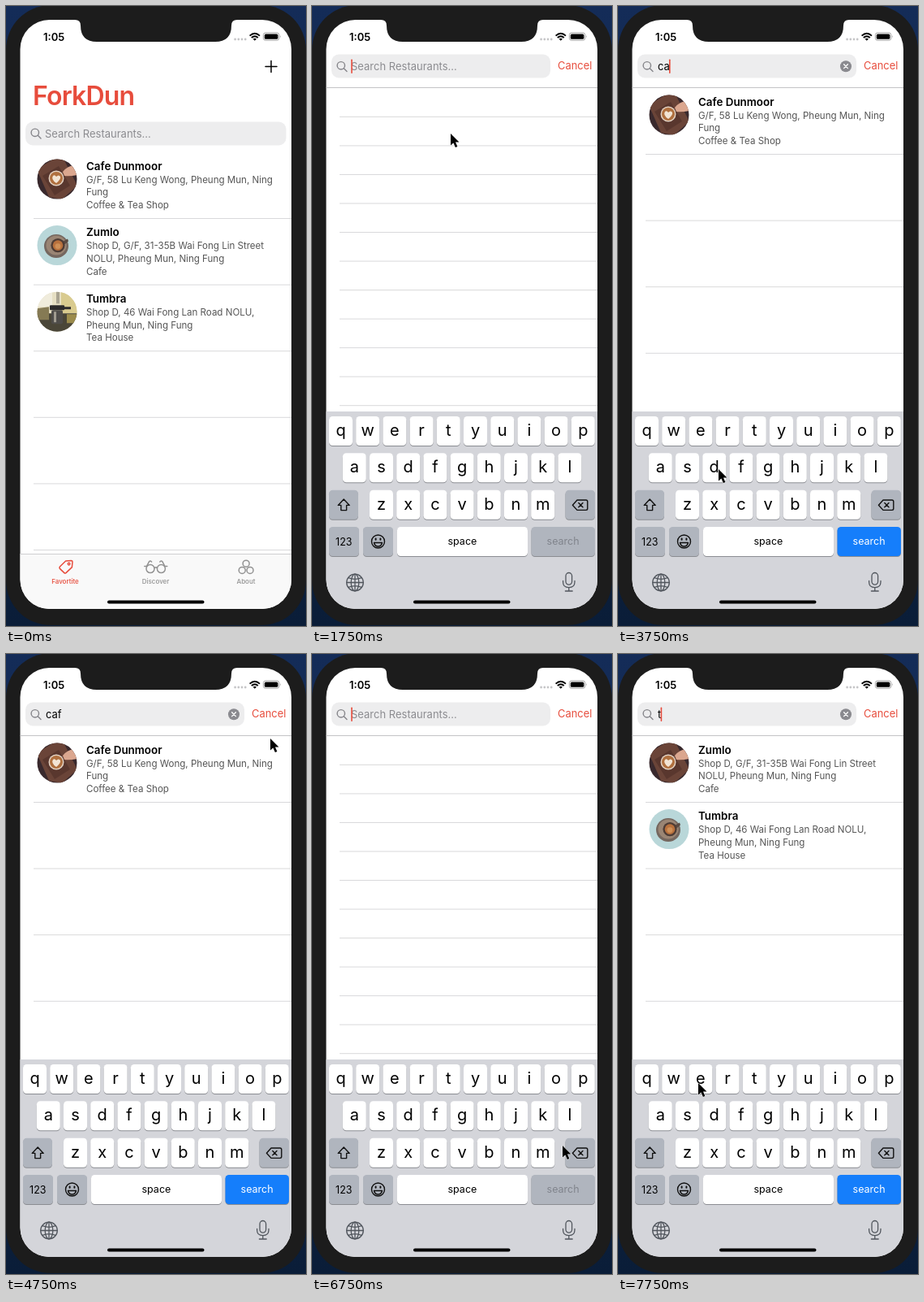
Recreate the animation shown at these times as an HTML page. Size 370 by 763 pixels, loop 8 s.

```html
<!DOCTYPE html>
<html lang="en">
<head>
<meta charset="utf-8">
<title>Restaurant search</title>
<style>
  html, body { margin: 0; width: 100%; height: 100%; overflow: hidden; background: #0b1a33; }
  svg { display: block; width: 100%; height: 100%; font-family: Inter, Roboto, "Liberation Sans", sans-serif; }
  .mid { text-anchor: middle; }
  .title { font-size: 13.4px; font-weight: 600; }
  .sub { font-size: 11.55px; fill: #555; }
  .field { font-size: 13px; }
  .hint { fill: #8c8c90; }
  .key { font-size: 20px; text-anchor: middle; }
  .small { font-size: 12.5px; text-anchor: middle; }
  .tab { font-size: 8px; font-weight: 500; text-anchor: middle; fill: #929292; }
  .rule { stroke: #d9d9db; stroke-width: 1; }
  .line { fill: none; stroke-linecap: round; stroke-linejoin: round; }
</style>
</head>
<body>
<svg viewBox="0 0 370 763" xmlns="http://www.w3.org/2000/svg">
  <defs>
    <linearGradient id="desk" x1="0" y1="0" x2="0" y2="1">
      <stop offset="0" stop-color="#142c58"/><stop offset="1" stop-color="#0a1d38"/>
    </linearGradient>
    <clipPath id="screen"><rect x="17.5" y="17" width="334.5" height="725" rx="36"/></clipPath>
    <clipPath id="round"><circle r="24.5"/></clipPath>

    <g id="photo0" clip-path="url(#round)">
      <rect x="-25" y="-25" width="50" height="50" fill="#39292d"/>
      <path d="M-25 -12 L-4 -25 H8 L25 8 L6 25 L-10 22Z" fill="#6a4438"/>
      <path d="M-18 -4 L2 -16 L16 8 L-3 20Z" fill="#59372e"/>
      <path d="M7 -9 Q14 -18 25 -17 V-5 Q15 -3 9 -4Z" fill="#dba78f"/>
      <circle cx="-1" cy="-1" r="9.5" fill="#e3d3c4"/>
      <circle cx="-1" cy="-1" r="8" fill="#b0703f"/>
      <path d="M-1 5 Q-8 0 -5 -4 Q-3 -6 -1 -3 Q2 -6 4 -3 Q5 0 -1 5Z" fill="#f2e4d4"/>
    </g>
    <g id="photo1" clip-path="url(#round)">
      <rect x="-25" y="-25" width="50" height="50" fill="#b9d7d9"/>
      <ellipse cx="-1" cy="1" rx="15" ry="14.5" fill="#75675f"/>
      <ellipse cx="-1" cy="0" rx="12.5" ry="12" fill="#9a8574"/>
      <path d="M6 -4 L13 -8 L14 -5 L8 0Z" fill="#5b4a42"/>
      <circle cx="1" cy="0" r="8.6" fill="#4e3c35"/>
      <circle cx="1" cy="0" r="6.3" fill="#b9713d"/>
      <circle cx="1" cy="1" r="3.4" fill="#cf9057"/>
    </g>
    <g id="photo2" clip-path="url(#round)">
      <rect x="-25" y="-25" width="50" height="50" fill="#e6dfc3"/>
      <path d="M-25 -25 H-6 V-6 H-25Z" fill="#f0ecdc"/>
      <path d="M5 -25 H25 V2 H5Z" fill="#d9cb8f"/>
      <path d="M-25 2 H25 V25 H-25Z" fill="#4a4638"/>
      <path d="M-25 -4 L-10 -6 V10 H-25Z" fill="#857a54"/>
      <path d="M12 3 H25 V14 H12Z" fill="#9b8b4c"/>
      <path d="M-1 -25 H3 V-10 H-1Z" fill="#a9a391"/>
      <rect x="-9" y="-8" width="18" height="6" rx="1" fill="#2d2b2b"/>
      <rect x="-7" y="-2" width="14" height="17" rx="2" fill="#4f4d4a"/>
      <rect x="-4" y="0" width="3" height="13" fill="#a09b90"/>
      <path d="M8 -6 H17 V-3 H8Z" fill="#2d2b2b"/>
    </g>
    <g id="lens" class="line" stroke="#85858a" stroke-width="1.4">
      <circle cx="-1.2" cy="-1.2" r="4.7"/><path d="M2.3 2.3 L6 6"/>
    </g>
  </defs>

  <rect width="370" height="763" fill="url(#desk)"/>
  <rect x="0" y="-1" width="370" height="763" rx="55" fill="#1c1c1c"/>
  <g clip-path="url(#screen)">
    <rect x="17" y="17" width="336" height="726" fill="#fff"/>
    <g id="home"></g>
    <g id="find"></g>
    <path d="M85 16 V17 Q92 17 92 24 Q92 44 112 44 H258 Q278 44 278 24 Q278 17 285 17 V16Z" fill="#1c1c1c"/>
    <text x="46" y="42.5" font-size="13" font-weight="600">1:05</text>
    <g fill="#c6c6c8">
      <circle cx="282.6" cy="41" r="1.4"/><circle cx="286.8" cy="41" r="1.4"/>
      <circle cx="291" cy="41" r="1.4"/><circle cx="295.2" cy="41" r="1.4"/>
    </g>
    <g fill="none" stroke="#000" stroke-width="1.9">
      <path d="M300.6 36.6 Q306.8 31 313 36.6"/><path d="M302.8 39 Q306.8 35.4 310.8 39"/>
    </g>
    <path d="M304.6 40.6 Q306.8 38.8 309 40.6 L306.8 42.8Z"/>
    <rect x="317.4" y="33" width="19.4" height="9.2" rx="2.6" fill="none" stroke="#9a9a9a" stroke-width=".9"/>
    <rect x="318.8" y="34.4" width="16.6" height="6.4" rx="1.5"/>
    <path d="M338 36 Q339.4 37.6 338 39.3Z" fill="#9a9a9a"/>
    <rect x="125" y="731.4" width="119.5" height="4.2" rx="2.1"/>
  </g>
  <path id="pointer" d="M0 0 V14.6 L3.4 11.5 L5.9 17 L8.4 15.9 L6 10.5 H10.5Z" stroke="#fff" stroke-width="1" stroke-linejoin="round" paint-order="stroke"/>
</svg>
<script>
const RED = '#e74c3c', ROW = 81.6;
const $ = id => document.getElementById(id);

const places = [
  ['Cafe Dunmoor', 'G/F, 58 Lu Keng Wong, Pheung Mun, Ning', 'Fung', 'Coffee & Tea Shop'],
  ['Zumlo', 'Shop D, G/F, 31-35B Wai Fong Lin Street', 'NOLU, Pheung Mun, Ning Fung', 'Cafe'],
  ['Tumbra', 'Shop D, 46 Wai Fong Lan Road NOLU,', 'Pheung Mun, Ning Fung', 'Tea House']
];

const text = (x, y, cls, s, more = '') =>
  `<text x="${x}" y="${y}" class="${cls}" ${more}>${s.replace('&', '&amp;')}</text>`;
const rule = (y, x = 34) => `<path class="rule" d="M${x} ${y}H352"/>`;
const rules = (y, gap, n) => Array.from({ length: n }, (_, i) => rule(y + gap * i)).join('');
const box = (x, y, w, h, r, fill, more = '') =>
  `<rect x="${x}" y="${y}" width="${w}" height="${h}" rx="${r}" fill="${fill}" ${more}/>`;

// Photos belong to the row position, texts to the filtered result.
const list = (items, top) => items.map(([name, ...lines], i) => {
  const y = top + ROW * i;
  return `<use href="#photo${i}" x="63" y="${y + 33}"/>` + text(99, y + 21.6, 'title', name) +
    lines.map((s, j) => text(99, y + 37.7 + 15.7 * j, 'sub', s)).join('');
}).join('');

const tabs = `
  <g class="line" stroke="${RED}" stroke-width="1.5">
    <path d="M73.6 683 L80.4 682.4 Q82 682.4 82 684 L81.4 690.6 L74 697.6 Q72.8 698.6 71.6 697.4 L66.4 692.4 Q65.4 691.2 66.4 690Z"/>
    <circle cx="77.6" cy="686.6" r="1.3"/>
  </g>
  <g class="line" stroke="#929292" stroke-width="1.5">
    <circle cx="178" cy="692.6" r="5"/><circle cx="191.4" cy="692.6" r="5"/>
    <path d="M183 691.6 Q184.7 690 186.4 691.6 M170.8 689.6 H173.6 M195.8 689.6 H198.8 M173.4 689.6 L176.6 683.6 Q178 682.4 179.6 684 M196 689.6 L192.8 683.6 Q191.4 682.4 189.8 684"/>
    <circle cx="296.1" cy="686.2" r="4"/><circle cx="291.2" cy="694.4" r="4"/><circle cx="301" cy="694.4" r="4"/>
  </g>` +
  text(73, 711, 'tab', 'Favortite', `style="fill:${RED}"`) +
  text(184.6, 711, 'tab', 'Discover') + text(296, 711, 'tab', 'About');

$('home').innerHTML =
  '<path class="line" d="M320 74.5H334M327 67.5V81.500" stroke="#000" stroke-width="1.5"/>' +
  text(33, 122.3, '', 'ForkDun', `font-size="32" font-weight="600" letter-spacing="-.8" fill="${RED}"`) +
  box(24, 142.5, 321.5, 29, 9, '#ededee') +
  '<use href="#lens" x="37" y="157"/>' + text(48, 161.6, 'field hint', 'Search Restaurants...') +
  list(places, 180) + rules(261.5, ROW, 6) +
  box(17, 674, 336, 70, 0, '#f9f9f9') + '<path d="M17 674.5H352" stroke="#cfcfd1"/>' + tabs;

const key = (x, y, w, fill, id = '') =>
  box(x, y + 1, w, 36, 4.5, '#8b8d92') + box(x, y, w, 36, 4.5, fill, id && `id="${id}"`);
const keys = (letters, x, y) => [...letters].map((c, i) =>
  key(x + 33.2 * i, y, 29, '#fff') + text(x + 33.2 * i + 14.5, y + 23.8, 'key', c)).join('');

const GREY = '#b0b5be';
const keyboard = box(17, 499, 336, 244, 0, '#d4d5da') +
  keys('qwertyuiop', 21, 505) + keys('asdfghjkl', 37.8, 550.3) + keys('zxcvbnm', 71, 595.700) +
  key(21, 595.7, 36, GREY) + key(312.5, 595.7, 36.5, GREY, 'del') +
  key(21, 641, 37, GREY) + key(63, 641, 37, GREY) +
  key(105, 641, 161, '#fff') + key(270.5, 641, 78.5, GREY, 'go') +
  text(39.3, 663.6, 'small', '123') + text(185.4, 662.6, 'small', 'space') +
  text(309.6, 662.6, 'small', 'search', 'id="goText"') + `
  <g class="line" stroke="#111" stroke-width="1.4">
    <path d="M39.200 607 L46.200 614.400 H42.600 V620.600 H35.800 V614.400 H32.200Z"/>
    <path d="M327 608 H338 Q339.800 608 339.800 609.800 V618.600 Q339.800 620.400 338 620.400 H327 L321.400 614.200Z M328.800 611.600 L334 616.800 M334 611.600 L328.800 616.800"/>
    <circle cx="81.500" cy="659" r="8"/>
    <path d="M76.500 660.500 H86.500 Q85.500 665 81.500 665 Q77.500 665 76.500 660.500Z"/>
    <path d="M78.600 655.600V656.800 M84.400 655.600V656.800" stroke-width="2"/>
  </g>
  <g class="line" stroke="#51565d" stroke-width="1.3">
    <circle cx="53" cy="709.500" r="10.300"/><ellipse cx="53" cy="709.500" rx="4.800" ry="10.300"/>
    <path d="M53 699.200V719.800 M42.700 709.500H63.300 M45 703.600Q53 707 61 703.600 M45 715.400Q53 712 61 715.400"/>
    <rect x="313" y="697.500" width="7.600" height="14.600" rx="3.800"/>
    <path d="M309.600 707.500 V709 Q309.600 715.600 316.800 715.600 Q324 715.600 324 709 V707.500 M316.800 715.600V720 M312.400 720H321.200"/>
  </g>`;

$('find').innerHTML =
  box(24, 59.5, 270, 29, 9, '#ededee') + '<use href="#lens" x="37" y="74.500"/>' +
  text(48, 79, 'field hint', 'Search Restaurants...', 'id="hint"') +
  text(49, 78.8, 'field', '', 'id="typed"') +
  `<g id="clear"><circle cx="281" cy="74.200" r="7" fill="#8a8a8f"/>
   <path class="line" d="M278.600 71.800l4.800 4.800m0 -4.800l-4.800 4.800" stroke="#fff" stroke-width="1.300"/></g>` +
  box(0, 65.5, 1.6, 17.5, .8, RED, 'id="caret"') +
  text(303, 78, '', 'Cancel', `font-size="12.9" fill="${RED}"`) +
  '<path d="M17 100.500H352" stroke="#c4c4c6"/><g id="results"></g>' + keyboard;

// One entry per 250 ms: pointer x, y, typed text, caret shown, delete key held.
const STEP = 250;
const steps = [
  [], [], [300, 372], [232, 262], [184, 188], [167, 162], [167, 162],
  [171, 157, '', 1], [171, 186, '', 1], [164, 350, '', 0], [155, 532, '', 0], [152, 605, '', 1],
  [152, 606, 'c', 1], [98, 586, 'c', 1], [54, 570, 'ca', 1], [124, 570, 'ca', 1], [150, 570, 'ca', 1],
  [152, 570, 'caf', 1], [256, 296, 'caf', 1], [326, 104, 'caf', 0], [324, 98, 'caf', 0], [324, 120, 'caf', 1],
  [325, 370, 'caf', 1], [326, 606, 'caf', 0], [326, 607, 'ca', 1, 1], [326, 607, 'ca', 1], [326, 607, 'c', 1, 1],
  [309, 605, '', 1], [238, 562, '', 1], [169, 523, '', 1], [166, 522, 't', 1], [99, 528, 't', 1]
];
const caretX = { '': 48.2, c: 56, ca: 63, caf: 68.2, t: 52.6 };
const show = (id, on) => $(id).setAttribute('display', on ? 'inline' : 'none');

let last = -1;
function draw(t) {
  const i = Math.floor(t / STEP) % steps.length;
  if (i === last) return;
  last = i;
  const [x, y, query, caret, held] = steps[i];
  const searching = query !== undefined;
  show('pointer', x !== undefined);
  $('pointer').setAttribute('transform', `translate(${x || 0} ${y || 0})`);
  show('home', !searching);
  show('find', searching);
  if (!searching) return;

  const found = query ? places.filter(p => p.slice(0, 3).join(' ').toLowerCase().includes(query)) : [];
  $('results').innerHTML = query
    ? list(found, 101) + rules(182.5, ROW, 4)
    : rules(136.4, 35.53, 11);
  $('typed').textContent = query;
  show('hint', !query);
  show('clear', query);
  show('caret', caret);
  $('caret').setAttribute('x', caretX[query]);
  $('go').setAttribute('fill', query ? '#157efb' : GREY);
  $('goText').setAttribute('fill', query ? '#fff' : '#80848c');
  $('del').setAttribute('fill', held ? '#fff' : GREY);
}

const start = performance.now();
function tick(now) {
  draw(Math.max(0, now - start));
  requestAnimationFrame(tick);
}
draw(0);
requestAnimationFrame(tick);
</script>
</body>
</html>
```
